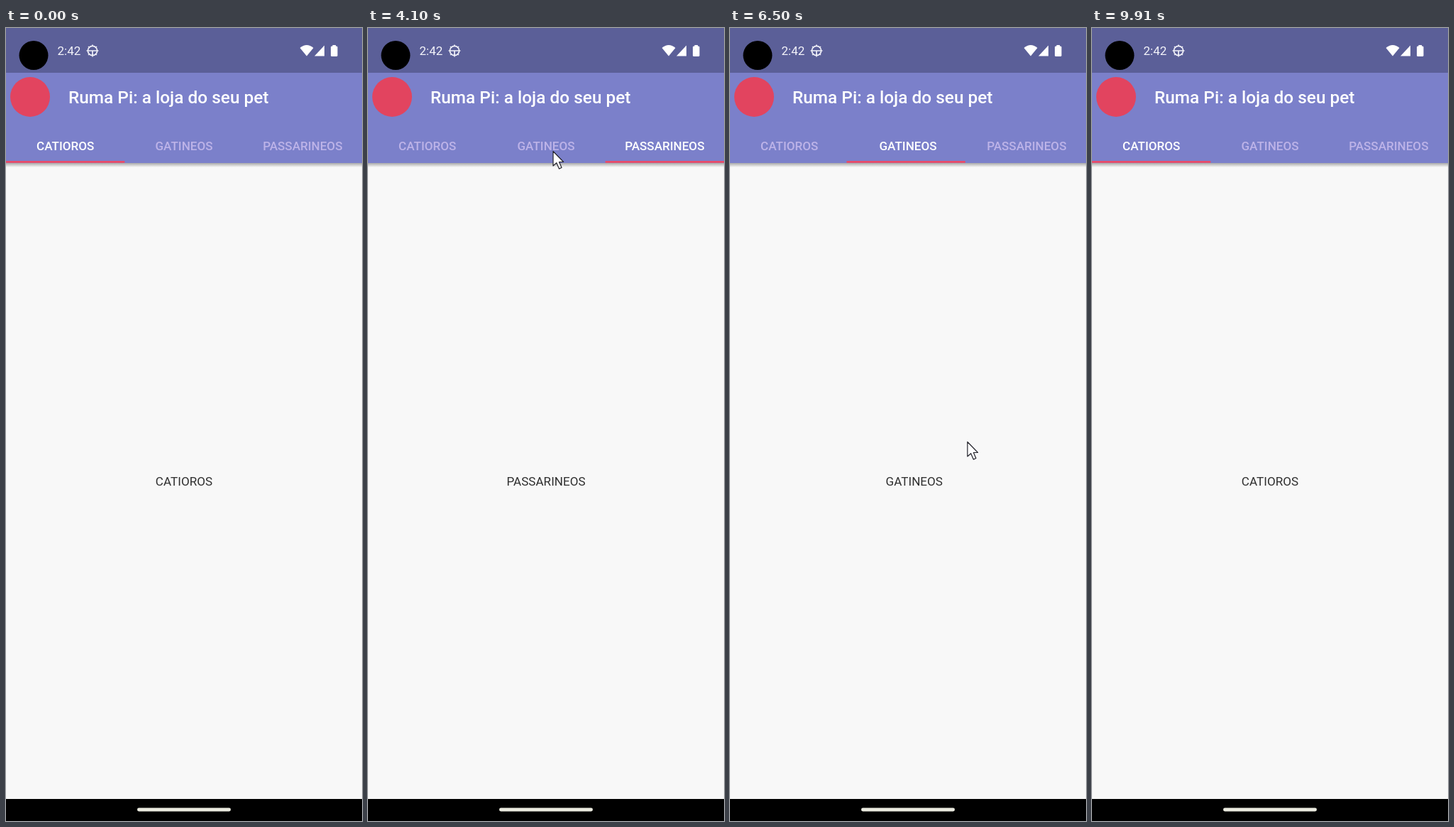
An HTML page with a canvas for the animation above (9.95 s loop, 502 by 1116 pixels).

```html
<!DOCTYPE html>
<html lang="pt-BR">
<head>
<meta charset="utf-8">
<title>Ruma Pi</title>
<style>
  html, body { margin: 0; width: 100%; height: 100%; overflow: hidden; background: #f8f8f8; }
  canvas { display: block; width: 502px; height: 1116px; }
</style>
</head>
<body>
<canvas id="stage"></canvas>
<script>
const W = 502, H = 1116, LOOP = 9950;
const STATUS_H = 63, TAB_TOP = 143, BAR_BOTTOM = 190, NAV_TOP = 1085;
const TABS = ['CATIOROS', 'GATINEOS', 'PASSARINEOS'];
const TAB_W = W / TABS.length;
const FONT = 'Roboto, "Noto Sans", sans-serif';

// The tour of pages is made twice: first by tapping tabs, then by swiping.
const TOUR = [0, 1, 2, 1, 0];
const TAP = { start: 2260, gap: 925, press: 90, glide: 500 };
const SWIPE = { start: 6014, gap: 862, drag: 170, glide: 600, share: 0.25 };

const canvas = document.getElementById('stage');
const ctx = canvas.getContext('2d');
const dpr = window.devicePixelRatio || 1;
canvas.width = W * dpr;
canvas.height = H * dpr;

const clamp = u => Math.max(0, Math.min(1, u));
const mix = (a, b, u) => a + (b - a) * u;
const linear = u => u;
const smooth = u => u * u * (3 - 2 * u);
const settle = u => 1 - (1 - u) ** 5;

const moves = [];
const presses = [];
const path = [];
const stop = (t, x, y, ease = smooth) => path.push({ t, x, y, ease });

function addTap(i) {
  const t = TAP.start + TAP.gap * i, up = t + TAP.press;
  const tab = TOUR[i + 1], x = 106 + 154.5 * tab, y = 173;
  presses.push({ t, tab, x, y });
  moves.push({ t: up, length: TAP.glide, from: TOUR[i], to: tab, ease: settle });
  stop(t, x, y);
  stop(up, x, y);
}

function addSwipe(i) {
  const t = SWIPE.start + SWIPE.gap * i, up = t + SWIPE.drag;
  const from = TOUR[i], to = TOUR[i + 1], dir = to - from;
  const held = mix(from, to, SWIPE.share);
  const x = dir > 0 ? 405 : 351, y = dir > 0 ? 582 : 561;
  moves.push({ t, length: SWIPE.drag, from, to: held, ease: linear });
  moves.push({ t: up, length: SWIPE.glide, from: held, to, ease: settle });
  stop(t, x, y);
  stop(up, x - dir * SWIPE.share * W, y, linear);
}

stop(400, 454, 30);
stop(1000, 40, 165);
stop(1970, 201, 191);
for (let i = 0; i < 4; i++) addTap(i);
for (let i = 0; i < 4; i++) addSwipe(i);
stop(9570, 268, 612);
stop(9880, 92, 164);

function pageAt(t) {
  let pos = 0, selected = 0;
  for (const m of moves) {
    if (t < m.t) break;
    pos = mix(m.from, m.to, m.ease(clamp((t - m.t) / m.length)));
    if (m.ease === settle) selected = m.to;
  }
  return { pos, selected };
}

function pointerAt(t) {
  const i = path.findIndex(p => t < p.t);
  if (i < 1) return null;
  const a = path[i - 1], b = path[i];
  const u = b.ease((t - a.t) / (b.t - a.t));
  return [mix(a.x, b.x, u), mix(a.y, b.y, u)];
}

function rect(x, y, w, h, color) {
  ctx.fillStyle = color;
  ctx.fillRect(x, y, w, h);
}

function pill(x, y, w, h, r, color) {
  ctx.fillStyle = color;
  ctx.beginPath();
  ctx.roundRect(x, y, w, h, r);
  ctx.fill();
}

function disc(x, y, r, color) {
  ctx.fillStyle = color;
  ctx.beginPath();
  ctx.arc(x, y, r, 0, Math.PI * 2);
  ctx.fill();
}

function text(str, x, y, size, color, weight = 400, align = 'left') {
  ctx.font = `${weight} ${size}px ${FONT}`;
  ctx.textAlign = align;
  ctx.fillStyle = color;
  ctx.fillText(str, x, y);
}

const WIFI = new Path2D('M424 39.5L414.5 28Q424 20 433.5 28Z');
const SIGNAL = new Path2D('M435 39.5H449V24.5Z');
const ARROW = new Path2D('M0 0V20.5L4.8 16.2L8.4 24.6L12 23L8.5 15H14.6Z');

function drawWheel(x, y) {
  ctx.save();
  ctx.translate(x, y);
  ctx.strokeStyle = '#f0f0f8';
  ctx.lineWidth = 1.7;
  ctx.beginPath();
  ctx.arc(0, 0, 6.6, 0, Math.PI * 2);
  ctx.moveTo(-7, 0);
  ctx.lineTo(7, 0);
  ctx.moveTo(0, 0);
  ctx.lineTo(0, 7);
  for (let i = 0; i < 8; i++) {
    const c = Math.cos(i * Math.PI / 4), s = Math.sin(i * Math.PI / 4);
    ctx.moveTo(c * 6.6, s * 6.6);
    ctx.lineTo(c * 8.4, s * 8.4);
  }
  ctx.stroke();
  ctx.restore();
}

function drawStatusBar() {
  rect(0, 0, W, STATUS_H, '#5b5f98');
  disc(39, 38.5, 20.5, '#000');
  text('2:42', 72.5, 38, 17.1, '#f4f4fa');
  drawWheel(122, 32);
  ctx.fillStyle = '#fff';
  ctx.fill(WIFI);
  ctx.fill(SIGNAL);
  rect(460.5, 24, 4.5, 3, '#fff');
  pill(458, 25.5, 9.5, 14.5, 1.5, '#fff');
}

function drawPages(pos) {
  rect(0, BAR_BOTTOM, W, NAV_TOP - BAR_BOTTOM, '#f8f8f8');
  TABS.forEach((name, i) => {
    text(name, W / 2 + (i - pos) * W, 644, 17.1, '#303030', 400, 'center');
  });
}

function drawRipple({ t: down, tab, x, y }, t) {
  const age = t - down;
  if (age < 0 || age > 400) return;
  const fade = 1 - clamp((age - 200) / 200);
  const left = tab * TAB_W, height = BAR_BOTTOM - TAB_TOP;
  ctx.save();
  ctx.beginPath();
  ctx.rect(left, TAB_TOP, TAB_W, height);
  ctx.clip();
  rect(left, TAB_TOP, TAB_W, height, `rgba(255,255,255,${0.07 * clamp(age / 40) * fade})`);
  disc(x, y, 12 + 120 * smooth(clamp((age - 40) / 240)), `rgba(255,255,255,${0.08 * fade})`);
  ctx.restore();
}

function drawAppBar(t, pos, selected) {
  const shade = ctx.createLinearGradient(0, BAR_BOTTOM, 0, BAR_BOTTOM + 6);
  shade.addColorStop(0, 'rgba(60,60,60,0.42)');
  shade.addColorStop(1, 'rgba(60,60,60,0)');
  rect(0, BAR_BOTTOM, W, 6, shade);

  rect(0, STATUS_H, W, BAR_BOTTOM - STATUS_H, '#7b80ca');
  disc(34, 97, 28, '#e2445f');
  text('Ruma Pi: a loja do seu pet', 88, 106, 24.4, '#fff', 500);

  presses.forEach(p => drawRipple(p, t));
  TABS.forEach((name, i) => {
    const color = i === selected ? '#fff' : '#bdb3e8';
    text(name, (i + 0.5) * TAB_W, 172, 17.1, color, 500, 'center');
  });
  rect(pos * TAB_W, 187.2, TAB_W, 2.5, '#f4465f');
}

function drawNavBar() {
  rect(0, NAV_TOP, W, H - NAV_TOP, '#000');
  pill(185, 1097.6, 132, 4.9, 2.4, '#ebebe0');
}

function drawPointer(x, y) {
  ctx.save();
  ctx.translate(x + 0.5, y + 0.5);
  ctx.fillStyle = '#fff';
  ctx.fill(ARROW);
  ctx.strokeStyle = '#25252d';
  ctx.lineWidth = 1.2;
  ctx.lineJoin = 'round';
  ctx.stroke(ARROW);
  ctx.restore();
}

function draw(t) {
  const { pos, selected } = pageAt(t);
  ctx.setTransform(dpr, 0, 0, dpr, 0, 0);
  drawPages(pos);
  drawAppBar(t, pos, selected);
  drawStatusBar();
  drawNavBar();
  const pointer = pointerAt(t);
  if (pointer) drawPointer(...pointer);
}

const start = performance.now();
function tick(now) {
  draw(Math.max(0, now - start) % LOOP);
  requestAnimationFrame(tick);
}
draw(0);
requestAnimationFrame(tick);
</script>
</body>
</html>
```
